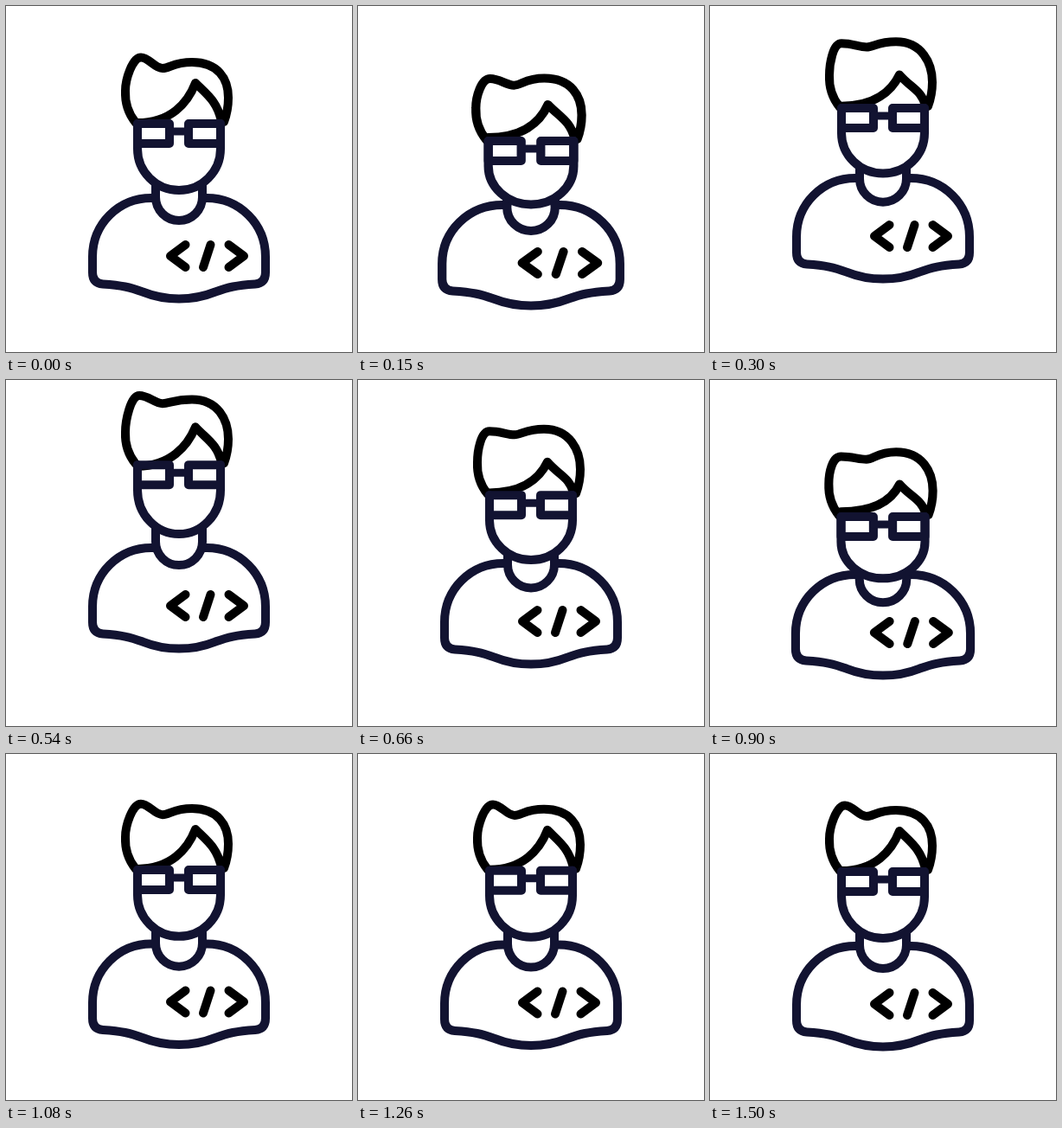
Animation, 400 px wide and 400 px high, one loop 3530 ms. Source, as an HTML page:

```html
<!DOCTYPE html>
<html lang="en">
<head>
<meta charset="utf-8">
<title>Jumping coder</title>
<style>
  html, body { margin: 0; width: 100%; height: 100%; overflow: hidden; background: #fff; }
  svg { display: block; width: 100%; height: 100%; fill: none; stroke: #121331; stroke-width: 10; stroke-linecap: round; stroke-linejoin: round; }
  .black { stroke: #000; }
</style>
</head>
<body>
<svg viewBox="0 0 400 400">
  <g id="body">
    <path d="M173 222H168C130 222 100 252 100 290V308Q100 320.500 112 321.500C134 323 143 325 158 330.500Q178 338.500 200 338.500Q222 338.500 242 330.500C257 325 266 323 288 321.500Q300 320.500 300 308V290C300 252 270 222 232 222H227"/>
    <path id="neck"/>
    <path class="black" d="M207.500 276L190 289L207.500 302M236.500 276L228 302M257.500 276L275 289L257.500 302"/>
  </g>
  <g id="head">
    <path id="hair" class="black"/>
    <path id="face"/>
    <path d="M152 0H189V23H152ZM211 0H248V23H211Z"/>
    <path d="M189 9H211" stroke-width="9"/>
  </g>
</svg>
<script>
const LOOP = 3530, STEP = 30, END = 1500, BROW = 136;

const smooth = u => u * u * (3 - 2 * u);
const rise = u => u * (2 - u);   // slows under gravity
const fall = u => u * u;         // speeds up under gravity

// Each track starts at 0 and eases to [time, value, easing]
const bodyTrack = [[150, 8], [442, -32.5, rise], [734, 8, fall], [1080, -2.5], [END, 0]];
const headTrack = [[202, 24], [461, -44.4, rise], [720, 26, fall], [820, 29, rise], [1080, -2], [END, 0]];
const flopTrack = [[300, 1], [540, 0.5], [660, 1], [900, 1], [1080, 0]];

function at(track, t) {
  let t0 = 0, v0 = 0;
  for (const [t1, v1, ease = smooth] of track) {
    if (t < t1) return v0 + (v1 - v0) * ease((t - t0) / (t1 - t0));
    [t0, v0] = [t1, v1];
  }
  return v0;
}

const $ = id => document.getElementById(id);
const draw = (id, d) => $(id).setAttribute('d', d);
const place = (id, y, sx) =>
  $(id).setAttribute('transform', `translate(200 ${y}) scale(${sx} 1) translate(-200 0)`);

function render(t) {
  const body = at(bodyTrack, t), head = at(headTrack, t), flop = at(flopTrack, t);
  const wide = 1 + Math.max(0, body) * 0.0035;
  const sink = head - body;      // how far the head is pressed into the body

  const chin = 77 - 0.3 * sink;
  const collar = 221 + sink * (sink < 0 ? 0.6 : 0.33);
  const neckTop = Math.min(collar, BROW + sink + chin - 7);

  // Hair heights above the brow
  const base = -1 - 0.25 * sink;
  const quiff = -76.5 + 0.37 * sink, tip = 156 - 4 * flop;
  const dip = -64 - 8 * flop + 0.3 * sink;
  const crown = -71 - 6.5 * flop + 0.15 * sink;
  const part = -47 + 8 * flop + 0.08 * sink;

  place('body', body, wide);
  place('head', BROW + head, wide);
  draw('neck', `M173 ${neckTop}V${collar}A27 27 0 0 0 227 ${collar}V${neckTop}`);
  draw('face', `M152 0V29A48 ${chin - 29} 0 0 0 248 29V0`);
  draw('hair', `M150 -1C141 -12 137.5 -26 138 -38C138 -51 ${tip - 10} ${quiff} ${tip} ${quiff}
    C165 ${quiff} 172 ${dip} 181 ${dip}C189 ${dip} 194 ${crown} 215 ${crown}
    C245 ${crown} 257 -52 257 -30C257 -20 255 -10 252 -2
    M152 ${base}C190 ${base} 210 ${part / 2} 219 ${part}
    C233 ${part + 14 + 2 * flop} 244 ${part * 0.55} 249 -3`);
}

const start = performance.now();
function tick() {
  const t = (performance.now() - start) % LOOP;
  render(Math.min(END, Math.floor(t / STEP) * STEP));
  requestAnimationFrame(tick);
}
tick();
</script>
</body>
</html>
```
